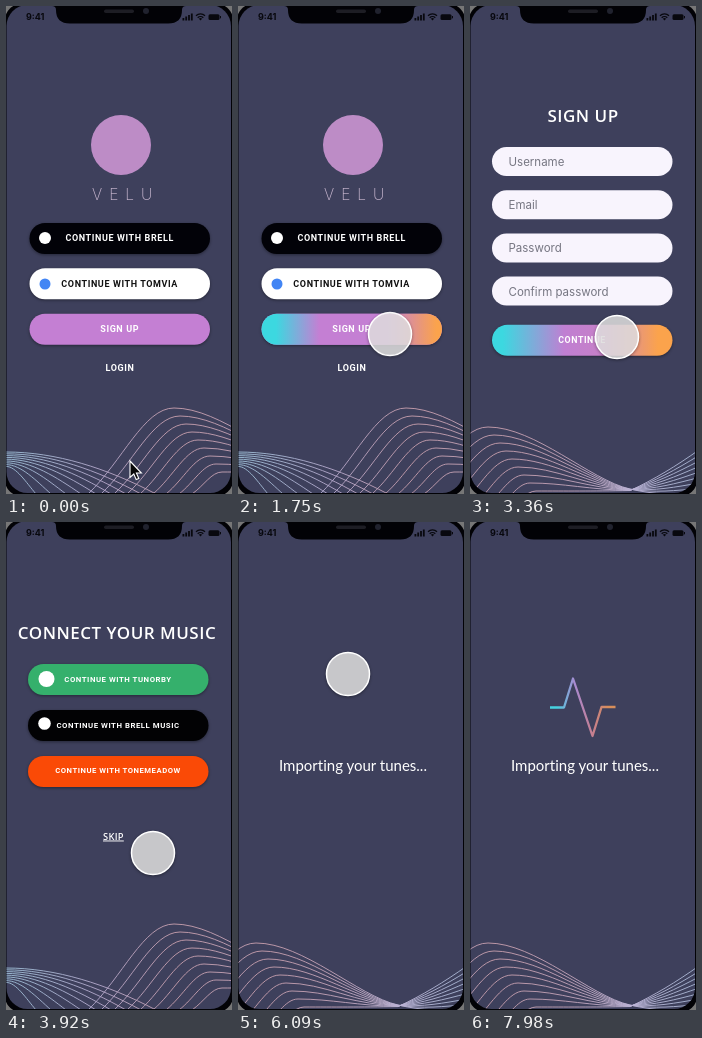
These frames come from a looping animation (226x488 px, 8000 ms). An HTML page:

```html
<!DOCTYPE html>
<html lang="en">
<head>
<meta charset="utf-8">
<title>App onboarding</title>
<style>
html, body { margin: 0; width: 100%; height: 100%; overflow: hidden; background: #000; }
svg { display: block; width: 100vw; height: 100vh; }
text { fill: #fff; font-family: "Open Sans", "Noto Sans", sans-serif; }
.label { font-family: Roboto, sans-serif; font-weight: 700; letter-spacing: .067em; text-anchor: middle; }
.title { font-weight: 600; font-size: 17px; letter-spacing: .5px; text-anchor: middle; }
.hint { font: 400 11.5px Inter, sans-serif; fill: #767682; }
.brand { font: 200 15.5px Inter, Lato, sans-serif; letter-spacing: 7px; fill: #cbb9d2; }
.status { font: 700 9px Inter, sans-serif; fill: #08080e; }
.progress { font: 400 15px Lato, sans-serif; font-variant-ligatures: none; }
.shadow { filter: drop-shadow(0 1.5px 1.5px rgba(0, 0, 0, .4)); }

.welcome, .signup, .connect, .importing, .hover, .pulse, .touch, .arrow, .waves {
  animation: 8s linear infinite;
}
.welcome { animation-name: welcome; }
.signup { animation-name: signup; }
.connect { animation-name: connect; }
.importing { animation-name: importing; }
.hover { animation-name: hover; }
.pulse { animation-name: pulse; stroke-dasharray: 1 2; }
.arrow { animation-name: arrow; }
.touch { animation-name: move, press; }
.waves { animation-name: drift; animation-timing-function: ease-out; }

@keyframes welcome { 0%, 26.6% { opacity: 1 } 30.6%, 100% { opacity: 0 } }
@keyframes signup {
  0%, 26.6% { opacity: 0 } 30.6%, 44.4% { opacity: 1 } 49%, 100% { opacity: 0 }
}
@keyframes connect {
  0%, 44.4% { opacity: 0 } 49%, 69.5% { opacity: 1 } 74.3%, 100% { opacity: 0 }
}
@keyframes importing { 0%, 69.5% { opacity: 0 } 74.3%, 100% { opacity: 1 } }
@keyframes hover { 0%, 16.5% { opacity: 0 } 20.2%, 100% { opacity: 1 } }
@keyframes pulse {
  0%, 88.9% { stroke-dashoffset: 1; opacity: 0 }
  89% { stroke-dashoffset: 1; opacity: 1 }
  99%, 100% { stroke-dashoffset: 0; opacity: 1 }
}
@keyframes arrow { 0%, 6.12% { opacity: 1 } 6.13%, 100% { opacity: 0 } }
@keyframes press {
  0%, 6.12% { opacity: 0 } 6.13%, 81.3% { opacity: 1 } 82.2%, 100% { opacity: 0 }
}
@keyframes move {
  0%, 6.125% { transform: translate(127px, 463px) }
  10.5% { transform: translate(130px, 405px) }
  17.5% { transform: translate(148px, 336px) }
  21.875% { transform: translate(152px, 328px) }
  30.6%, 63.875% { transform: translate(147px, 331px) }
  65.625% { transform: translate(170px, 262px) }
  68.25%, 100% { transform: translate(110px, 152px) }
}
@keyframes drift {
  0%, 26.6% { transform: none }
  30.6%, 44.4% { transform: translate(-150px, 19px) }
  49%, 69.5% { transform: none }
  74.3%, 100% { transform: translate(-150px, 19px) }
}
</style>
</head>
<body>
<svg viewBox="0 0 226 488" preserveAspectRatio="none">
  <defs>
    <linearGradient id="rainbow">
      <stop offset=".06" stop-color="#3cd8e0"/>
      <stop offset=".4" stop-color="#c07fd2"/>
      <stop offset=".6" stop-color="#c680c8"/>
      <stop offset=".92" stop-color="#fba34c"/>
    </linearGradient>
    <linearGradient id="glow">
      <stop offset=".08" stop-color="#3cd8e0"/>
      <stop offset=".32" stop-color="#c47fd3"/>
      <stop offset=".7" stop-color="#c47fd3"/>
      <stop offset=".97" stop-color="#fba34c"/>
    </linearGradient>
    <linearGradient id="beat" gradientUnits="userSpaceOnUse" x1="80" x2="145" y1="0" y2="0">
      <stop offset=".1" stop-color="#45d3df"/>
      <stop offset=".38" stop-color="#a98ad2"/>
      <stop offset=".65" stop-color="#c57f90"/>
      <stop offset=".9" stop-color="#d88e5a"/>
    </linearGradient>
    <linearGradient id="strand" gradientUnits="userSpaceOnUse" x1="0" x2="380" y1="0" y2="0">
      <stop offset="0" stop-color="#a9cfe6"/>
      <stop offset=".25" stop-color="#c3b4d8"/>
      <stop offset=".45" stop-color="#d9aab6"/>
      <stop offset=".65" stop-color="#d3b0c4"/>
      <stop offset=".82" stop-color="#c9bfe2"/>
      <stop offset="1" stop-color="#b6c8e4"/>
    </linearGradient>
    <clipPath id="screen"><rect x=".5" y="-1" width="224.5" height="488" rx="21"/></clipPath>
  </defs>

  <rect width="226" height="488" fill="#777"/>
  <rect x="-1" y="-2" width="228" height="492" rx="16" fill="#020206"/>
  <g clip-path="url(#screen)">
    <rect width="226" height="488" fill="#3e405c"/>
    <g class="waves" id="waves" fill="none" stroke="url(#strand)" stroke-width=".9" opacity=".9"></g>

    <g class="welcome" id="welcome">
      <circle cx="115" cy="139" r="30" fill="#bd8cc6"/>
      <text class="brand" x="86" y="194">VELU</text>
    </g>
    <g class="signup" id="signup">
      <text class="title" x="113" y="116">SIGN UP</text>
    </g>
    <g class="connect" id="connect">
      <text class="title" x="111" y="117">CONNECT YOUR MUSIC</text>
      <text x="97" y="317.5" font-size="9.3" font-weight="600" letter-spacing=".3" text-decoration="underline">SKIP</text>
    </g>
    <g class="importing">
      <text class="progress" x="41" y="248.5">Importing your tunes...</text>
      <path class="pulse" pathLength="1" d="M80 185.5H94L103 156.5L122.5 214L131.5 185H145.5"
        fill="none" stroke="url(#beat)" stroke-width="2.3" stroke-linejoin="round"/>
    </g>
  </g>

  <path d="M46 0Q50 0 50 4Q50 17.5 64 17.5H162Q176 17.5 176 4Q176 0 180 0Z" fill="#020206"/>
  <rect x="98" y="3.5" width="30" height="3.5" rx="1.75" fill="#1d1d24"/>
  <circle cx="140" cy="5" r="3" fill="#20222e"/>
  <text class="status" x="20" y="14.3">9:41</text>
  <g fill="#08080e">
    <path d="M176.5 12h1.8v2.5h-1.8zM179.3 10.5h1.8v4h-1.8zM182.1 9h1.8v5.5h-1.8zM184.9 7.5h1.8v7h-1.8z"/>
    <path d="M194.5 14.5l-1.6-1.7a2.3 2.3 0 0 1 3.2 0z"/>
    <path d="M191.7 11.7a4 4 0 0 1 5.6 0M190 9.7a6.4 6.4 0 0 1 9 0" fill="none" stroke="#08080e" stroke-width="1.3"/>
    <rect x="202.5" y="8.3" width="11" height="5.7" rx="1.5"/>
    <rect x="214" y="10" width="1" height="2.3"/>
  </g>

  <path class="arrow" d="M124 455V471.5L127.8 468L130.2 473.6L132.8 472.5L130.4 467H135.4Z"
    fill="#080808" stroke="#fff" stroke-width="1.1"/>
  <g class="touch">
    <circle r="21.5" fill="#efeeee" fill-opacity=".8" stroke="#fff" stroke-width="1.5" class="shadow"/>
  </g>
</svg>
<script>
const add = (id, markup) => document.getElementById(id).insertAdjacentHTML('beforeend', markup);

const pill = (x, y, fill, attrs = 'class="shadow"', height = 31) =>
  `<rect x="${x}" y="${y}" width="180.5" height="${height}" rx="${height / 2}" fill="${fill}" ${attrs}/>`;
const label = (x, y, words, size = 9, fill = '#fff') =>
  `<text class="label" x="${x}" y="${y}" font-size="${size}" style="fill:${fill}">${words}</text>`;
const dot = (x, y, r, fill) => `<circle cx="${x}" cy="${y}" r="${r}" fill="${fill}"/>`;

add('welcome',
  pill(23.5, 217, '#020208') + dot(39, 232, 6, '#fff') + label(113.7, 235, 'CONTINUE WITH BRELL') +
  pill(23.5, 262.3, '#fff') + dot(39, 278, 5.5, '#4285f4') + label(113.7, 280.5, 'CONTINUE WITH TOMVIA', 9, '#111') +
  pill(23.5, 307.8, '#c47fd3') + pill(23.5, 307.8, 'url(#glow)', 'class="hover"') +
  label(113.7, 326, 'SIGN UP') + label(114, 365.3, 'LOGIN'));

['Username', 'Email', 'Password', 'Confirm password'].forEach((hint, i) => {
  const y = 141 + 43.2 * i;
  add('signup', pill(22, y, '#f8f4fd', '', 29) + `<text class="hint" x="38.5" y="${y + 19}">${hint}</text>`);
});
add('signup', pill(22, 318.8, 'url(#rainbow)') + label(112, 337.3, 'CONTINUE', 8.8));

add('connect',
  pill(22, 142, '#35b06c') + dot(40.5, 157, 8, '#fff') + label(112, 160, 'CONTINUE WITH TUNORBY', 7.8) +
  pill(22, 188, '#020204') + dot(38.5, 201.5, 6.3, '#fff') + label(112, 205.8, 'CONTINUE WITH BRELL MUSIC', 7.8) +
  pill(22, 234, '#fa4a06') + label(112, 251.3, 'CONTINUE WITH TONEMEADOW', 7.7));

// Each strand fans down on the left, dips below the screen, then humps and pinches.
const floor = 488;
for (let i = 0; i < 9; i++) {
  const start = 446 + 1.8 * i, end = 150 - 15 * i;
  const foot = 82 + 13 * i, top = 168 + 6 * i, peak = 402 + 8 * i;
  const width = top - foot, pinch = 464 + .2 * i;
  add('waves', `<path d="M0 ${start}C${end / 3} ${start} ${end * .67} ${start + 16} ${end} ${floor}` +
    `M${foot} ${floor}C${foot + .4 * width} ${floor - .38 * (floor - peak)} ${top - .35 * width} ${peak} ${top} ${peak}` +
    `C${top + 47 - 2 * i} ${peak} 270 ${pinch - 9 + 1.2 * i} 310 ${pinch}` +
    `C335 ${pinch + 6 - 2.2 * i} 355 ${469 - 3.4 * i} 380 ${469 - 5.6 * i}"/>`);
}
</script>
</body>
</html>
```
